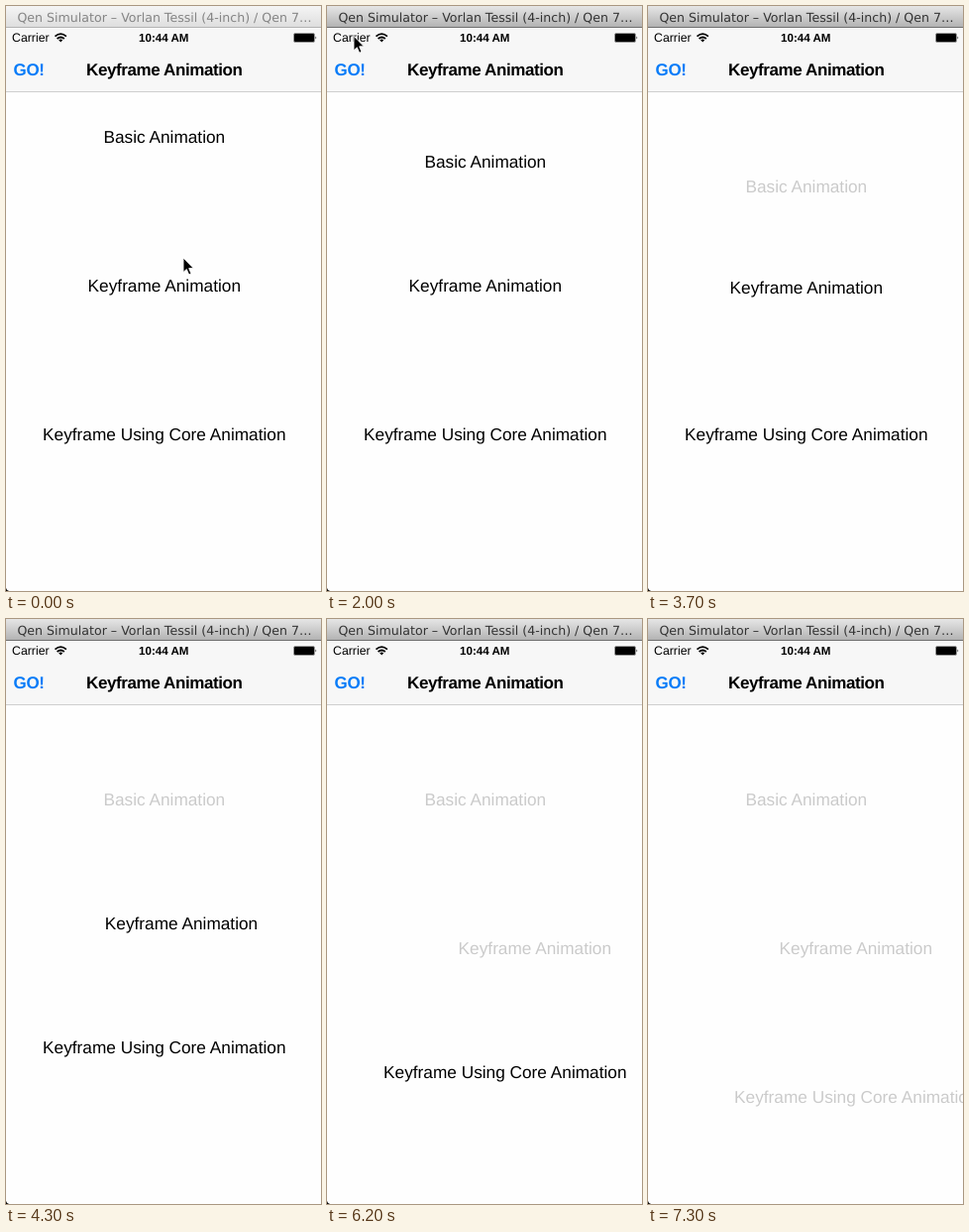
Recreate the animation shown at these times as an HTML page. Size 318x590 px, loop 8100 ms.

```html
<!DOCTYPE html>
<html lang="en">
<head>
<meta charset="utf-8">
<title>Keyframe Animation</title>
<style>
  html, body { margin: 0; width: 100%; height: 100%; overflow: hidden; background: #fefefe; }
  svg { display: block; width: 318px; height: 590px; }
  text { font-family: "Liberation Sans", Arial, sans-serif; text-anchor: middle; text-rendering: geometricPrecision; }
  .label { font-size: 17.25px; }
  .bold { font-weight: bold; letter-spacing: -.4px; font-size: 17px; }
  .left { text-anchor: start; }
  .window-title { font: 12.6px "DejaVu Sans", sans-serif; }
</style>
</head>
<body>
<svg viewBox="0 0 318 590">
  <defs>
    <linearGradient id="idleBar" x2="0" y2="1">
      <stop stop-color="#f5f5f5"/><stop offset="1" stop-color="#dedede"/>
    </linearGradient>
    <linearGradient id="activeBar" x2="0" y2="1">
      <stop stop-color="#e6e6e6"/><stop offset="1" stop-color="#b3b3b3"/>
    </linearGradient>
  </defs>

  <rect width="318" height="590" fill="#fefefe"/>
  <rect y="22" width="318" height="64" fill="#f7f7f7"/>
  <rect y="86" width="318" height="1" fill="#cfcfcf"/>

  <rect id="bar" width="318" height="21"/>
  <rect id="barEdge" y="21" width="318" height="1"/>
  <text id="windowTitle" class="window-title" x="160" y="16">Qen Simulator – Vorlan Tessil (4-inch) / Qen 7…</text>

  <text class="left" x="6" y="36" font-size="12.3">Carrier</text>
  <g fill="none" stroke="#000" stroke-width="1.8">
    <path d="M49.5 30.6Q55.2 25.6 60.9 30.6M51.6 33Q55.2 29.9 58.8 33"/>
    <path d="M55.2 36.4L53.2 34.2Q55.2 32.6 57.2 34.2Z" fill="#000" stroke="none"/>
  </g>
  <text x="159.3" y="36" font-size="11.6" font-weight="bold">10:44 AM</text>
  <rect x="290.5" y="27.5" width="21" height="9" rx="1.5" stroke="#999"/>
  <path d="M312.5 30.5q1.6 1.5 0 3z"/>

  <text id="go" class="bold left" x="7.6" y="70" fill="#087cf8">GO!</text>
  <text class="bold" x="159.8" y="70">Keyframe Animation</text>

  <text id="basic" class="label" x="159.8" y="138">Basic Animation</text>
  <text id="keyframe" class="label" x="159.8" y="288">Keyframe Animation</text>
  <text id="core" class="label" x="159.8" y="438">Keyframe Using Core Animation</text>

  <circle id="press" cx="24" cy="51" r="21" fill="#fff" fill-opacity=".4" stroke="#000" stroke-width="3"/>
  <path id="cursor" d="M0 0V14.5L3.3 11.5L5.7 17L8 16L5.7 10.6H10.3Z" stroke="#fff" stroke-width=".9"/>
  <path d="M0 587Q.5 589.5 3 590H0Z"/>
</svg>

<script>
const LOOP = 8100, STEP = 100, FADED = 0.2;
const $ = id => document.getElementById(id);
const progress = (t, start, length) => Math.min(1, Math.max(0, (t - start) / length));
const mix = (a, b, p) => a + (b - a) * p;

// cubic-bezier(.42, 0, .58, 1)
function easeInOut(x) {
  let s = x;
  for (let i = 0; i < 6; i++) {
    const error = ((0.52 * s - 0.78) * s + 1.26) * s - x;
    s -= error / ((1.56 * s - 1.56) * s + 1.26);
  }
  return s * s * (3 - 2 * s);
}

function place(id, x, y, opacity = 1) {
  $(id).setAttribute("transform", `translate(${x} ${y})`);
  $(id).setAttribute("opacity", opacity);
}

// Down, right, down: one unit of p per leg.
function staircase(p) {
  const leg = n => progress(p, n, 1);
  return [50 * leg(1), 25 * (leg(0) + leg(2))];
}

function drawCursor(t) {
  const p = easeInOut(progress(t, 0, 1000)), q = 1 - p;
  const curve = (a, b, c) => q * q * a + 2 * q * p * b + p * p * c;
  const leave = progress(t, 1800, 400) ** 2;
  place("cursor", curve(179, 102, 24) + 12 * leave, curve(254, 115, 49) - 75 * leave);
}

function draw(t) {
  const active = t >= 1400;
  const pressed = t >= 1200 && t < 1500;
  $("bar").setAttribute("fill", active ? "url(#activeBar)" : "url(#idleBar)");
  $("barEdge").setAttribute("fill", active ? "#707070" : "#b4b4b4");
  $("windowTitle").setAttribute("fill", active ? "#333" : "#858585");
  $("press").setAttribute("opacity", +pressed);
  $("go").setAttribute("opacity", pressed ? 0.8 : 1);

  place("basic", 0, 50 * easeInOut(progress(t, 1500, 1000)),
    mix(1, FADED, easeInOut(progress(t, 2500, 1000))));

  const eased = 4 * easeInOut(progress(t, 3495, 2000));
  place("keyframe", ...staircase(eased), mix(1, FADED, progress(eased, 3, 1)));

  place("core", ...staircase(progress(t, 5500, 1500) * 3),
    mix(1, FADED, easeInOut(progress(t, 7000, 250))));

  drawCursor(t);
}

const origin = performance.now();
function tick() {
  const t = (performance.now() - origin) % LOOP;
  draw(Math.floor(t / STEP) * STEP);
  requestAnimationFrame(tick);
}
tick();
</script>
</body>
</html>
```
